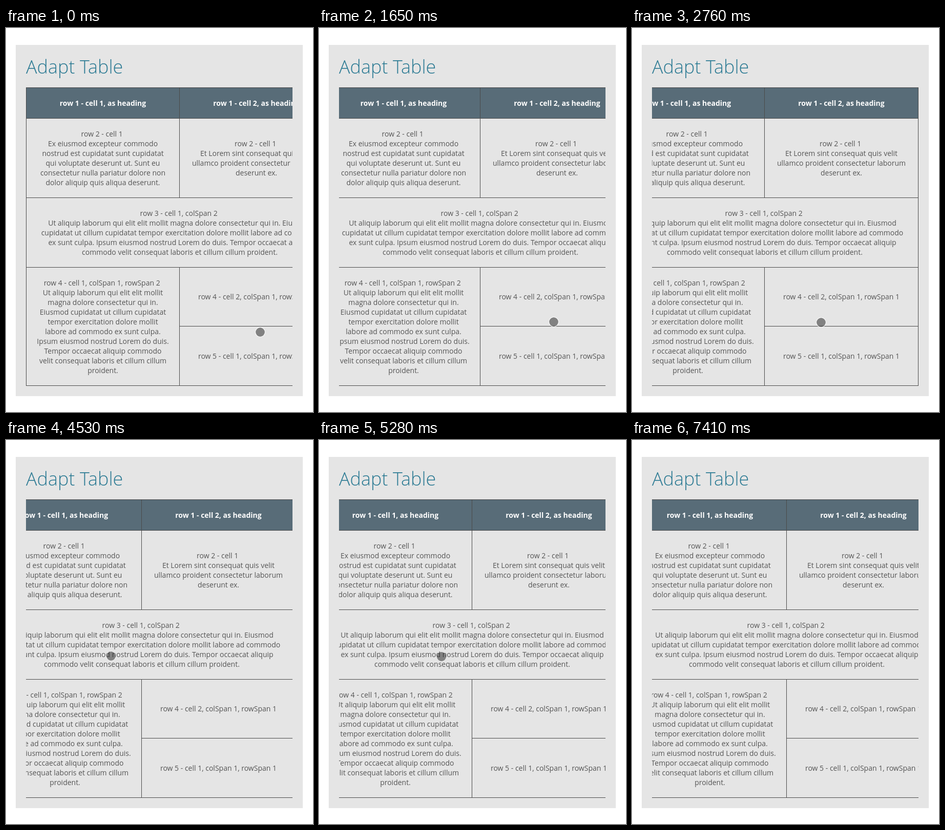
An HTML page that plays this animation: 599 by 750 pixels, repeating every 8070 ms.

```html
<!DOCTYPE html>
<html lang="en">
<head>
<meta charset="utf-8">
<title>Adapt Table</title>
<style>
  @property --scroll { syntax: '<integer>'; inherits: false; initial-value: 0; }
  @property --x { syntax: '<integer>'; inherits: false; initial-value: 496; }
  @property --y { syntax: '<integer>'; inherits: false; initial-value: 594; }

  html, body { margin: 0; width: 100%; height: 100%; overflow: hidden; background: #fff; }
  body { position: relative; font: 14px/19px "Open Sans", sans-serif; color: #555; }

  .panel { position: absolute; left: 19px; top: 33px; width: 560px; height: 686px; background: #e5e5e5; }
  h1 {
    position: absolute; left: 20px; top: 18px; margin: 0;
    font-size: 36px; line-height: 49px; font-weight: 300; color: #2b7a93; white-space: nowrap;
  }
  .view { position: absolute; left: 20px; top: 83px; width: 520px; height: 583px; overflow: hidden; }

  /* The gaps show the background as 1px rules. */
  .table {
    position: absolute; top: 0; left: calc(var(--scroll) * -1px);
    display: grid; grid-template: 59px 154px 135px 114px 115px / 298px 299px;
    gap: 1px; padding: 1px; background: #4a4a4a;
    animation: scroll 8070ms linear infinite;
  }
  .table > div {
    display: flex; align-items: center; justify-content: center;
    background: #e5e5e5; text-align: center; white-space: nowrap;
  }
  .table > .head { background: #586c78; color: #fff; font-weight: 700; }
  .table > .wide { grid-column: span 2; }
  .table > .tall { grid-row: span 2; }
  .table > .upper { padding-bottom: 1px; }

  .touch {
    position: absolute; box-sizing: border-box; width: 20px; height: 20px;
    left: calc(var(--x) * 1px - 10px); top: calc(var(--y) * 1px - 10px);
    border: 1px solid rgba(255, 255, 255, .85); border-radius: 50%;
    background: rgba(40, 40, 40, .53) padding-box;
    animation: move 8070ms linear infinite, ring 8070ms linear infinite;
  }

  @keyframes scroll {
    0%, 17.4% { --scroll: 0; }
    20.45% { --scroll: 24; animation-timing-function: ease-out; }
    26.02% { --scroll: 49; }
    26.77% { --scroll: 50; }
    31%, 55.2% { --scroll: 80; }
    56.2% { --scroll: 74; animation-timing-function: ease-out; }
    62.08%, 64.68% { --scroll: 43; }
    65.43% { --scroll: 40; }
    67.29%, 69.5% { --scroll: 38; }
    69.89%, 100% { --scroll: 37; }
  }

  @keyframes move {
    0%, 2.6% { --x: 496; --y: 594; }
    5.2%, 16.36% { --x: 490; --y: 575; }
    17.4% { --x: 482; --y: 574; }
    20.45% { --x: 458; --y: 574; animation-timing-function: ease-out; }
    26.02% { --x: 433; --y: 575; }
    26.77% { --x: 432; --y: 575; }
    31% { --x: 402; --y: 575; animation-timing-function: ease-out; }
    34.2% { --x: 369; --y: 575; }
    40.52% { --x: 369; --y: 575; animation-timing-function: ease-in-out; }
    48.7% { --x: 183; --y: 426; }
    50.19% { --x: 187; --y: 430; }
    51.3%, 54.65% { --x: 193; --y: 423; }
    55.2% { --x: 199; --y: 422; }
    56.2% { --x: 205; --y: 422; animation-timing-function: ease-out; }
    62.08%, 64.68% { --x: 236; --y: 423; }
    65.43% { --x: 239; --y: 423; }
    67.29%, 69.5% { --x: 241; --y: 423; }
    69.89% { --x: 242; --y: 423; }
    82.9% { --x: 242; --y: 423; animation-timing-function: cubic-bezier(.4, 0, .7, .9); }
    91.82%, 100% { --x: 552; --y: 762; }
  }

  @keyframes ring {
    0%, 54.65% { border-color: rgba(255, 255, 255, .85); }
    56.13%, 62.08% { border-color: rgba(255, 255, 255, .55); }
    64.68%, 82.9% { border-color: rgba(255, 255, 255, 0); }
    84%, 100% { border-color: rgba(255, 255, 255, .85); }
  }
</style>
</head>
<body>
  <div class="panel">
    <h1>Adapt Table</h1>
    <div class="view">
      <div class="table">
        <div class="head">row 1 - cell 1, as heading</div>
        <div class="head">row 1 - cell 2, as heading</div>
        <div><span>row 2 - cell 1&nbsp;<br>Ex eiusmod excepteur commodo<br>nostrud est cupidatat sunt cupidatat<br>qui voluptate deserunt ut. Sunt eu<br>consectetur nulla pariatur dolore non<br>dolor aliquip quis aliqua deserunt.</span></div>
        <div><span>row 2 - cell 1&nbsp;<br>Et Lorem sint consequat quis velit<br>ullamco proident consectetur laborum<br>deserunt ex.</span></div>
        <div class="wide"><span>row 3 - cell 1, colSpan 2&nbsp;<br>Ut aliquip laborum qui elit elit mollit magna dolore consectetur qui in. Eiusmod<br>cupidatat ut cillum cupidatat tempor exercitation dolore mollit labore ad commodo<br>ex sunt culpa. Ipsum eiusmod nostrud Lorem do duis. Tempor occaecat aliquip<br>commodo velit consequat laboris et cillum cillum proident.</span></div>
        <div class="tall"><span>row 4 - cell 1, colSpan 1, rowSpan 2&nbsp;<br>Ut aliquip laborum qui elit elit mollit<br>magna dolore consectetur qui in.<br>Eiusmod cupidatat ut cillum cupidatat<br>tempor exercitation dolore mollit<br>labore ad commodo ex sunt culpa.<br>Ipsum eiusmod nostrud Lorem do duis.<br>Tempor occaecat aliquip commodo<br>velit consequat laboris et cillum cillum<br>proident.</span></div>
        <div class="upper">row 4 - cell 2, colSpan 1, rowSpan 1</div>
        <div>row 5 - cell 1, colSpan 1, rowSpan 1</div>
      </div>
    </div>
  </div>
  <div class="touch"></div>
</body>
</html>
```
